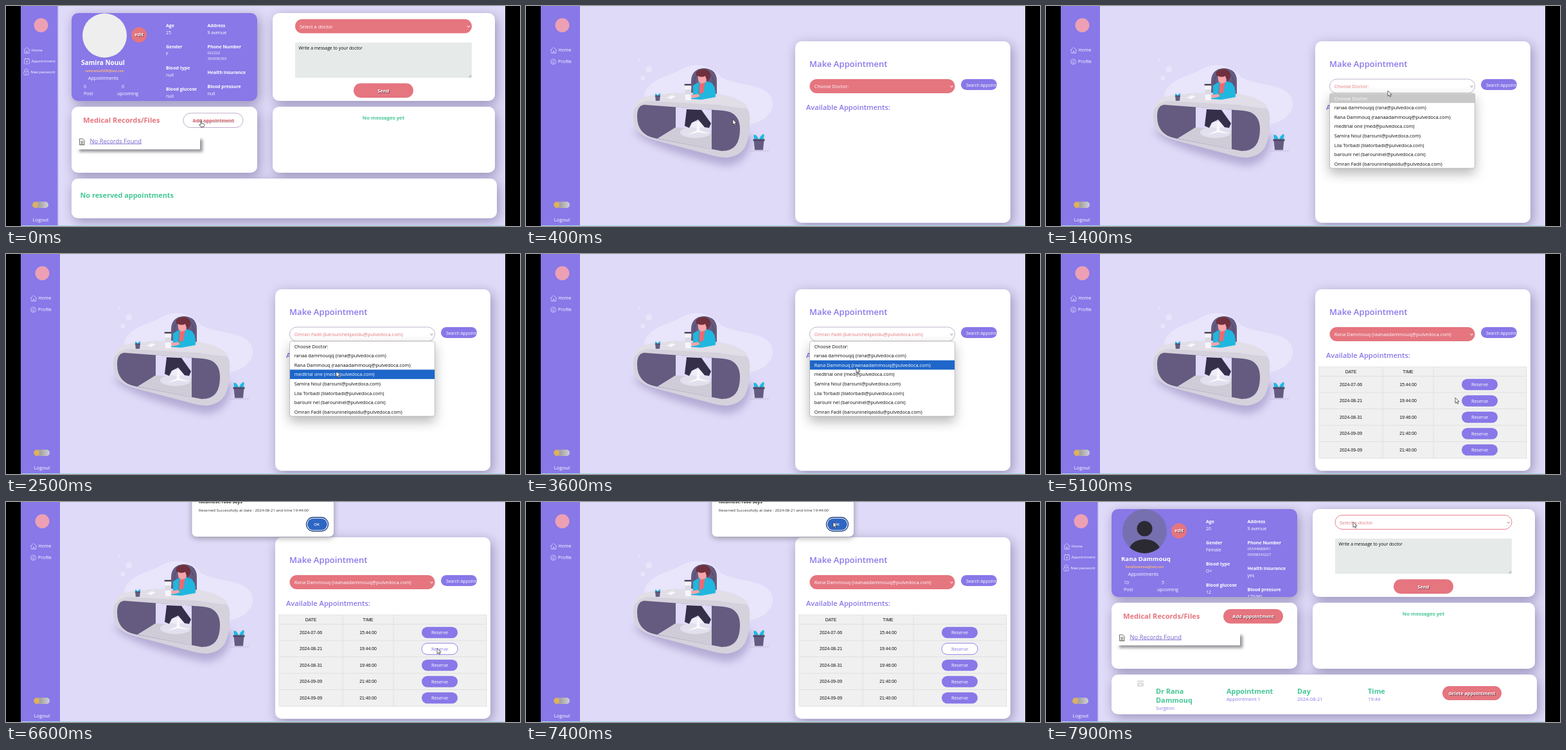
These frames come from a looping animation (800x343 px, 8 s). An HTML page:

```html
<!DOCTYPE html>
<html lang="en">
<head>
<meta charset="utf-8">
<title>Booking an appointment</title>
<style>
  html, body { margin: 0; width: 100%; height: 100%; overflow: hidden; background: #000; }
  svg { display: block; width: 800px; height: 343px; }
  text { font-family: "Open Sans", "Noto Sans", sans-serif; white-space: pre; }
  .grid text { font-family: "Liberation Sans", Arial, sans-serif; }
  .card { filter: drop-shadow(3px 5px 9px rgba(70, 58, 115, .46)); }
  .btn rect { fill: var(--fill); stroke: none; }
  .btn text, .btn path { fill: #fff; }
  .btn.on rect { fill: #fff; stroke: var(--line); stroke-width: .9; }
  .btn.on text { fill: var(--fill); }
  .btn.on path { fill: #999; }
  .raised text { filter: drop-shadow(1px 1px .6px rgba(50, 20, 40, .65)); }
  .raised.on text { filter: drop-shadow(1px 1px .6px rgba(50, 20, 40, .3)); }
  .option rect { fill: none; }
  .option text { fill: #0c0c0c; }
  .option.chosen rect { fill: #c8c8c8; }
  .option.hover rect { fill: #1e66c9; }
  .option.chosen text, .option.hover text { fill: #fff; }
</style>
</head>
<body>
<svg id="stage" viewBox="0 0 800 343" xmlns="http://www.w3.org/2000/svg"></svg>
<script>
const PURPLE = '#8878e8', CORAL = '#e5757f', GREEN = '#45c795', DARK = '#655b80', PALE = '#dfdaf7';
const LOOP = 8000, ROW_TOP = 136.6, ROW_H = 14.58;

// Drawing helpers
const text = (x, y, s, size, fill = '#fff', weight = 400, more = '') =>
  `<text x="${x}" y="${y}" font-size="${size}" fill="${fill}" font-weight="${weight}" ${more}>${s}</text>`;
const mid = (x, y, s, size, fill, weight, more = '') =>
  text(x, y, s, size, fill, weight, 'text-anchor="middle" ' + more);
const box = (x, y, x2, y2, r, fill, more = '') =>
  `<rect x="${x}" y="${y}" width="${x2 - x}" height="${y2 - y}" rx="${r}" fill="${fill}" ${more}/>`;
const path = (d, fill, more = '') => `<path d="${d}" fill="${fill}" ${more}/>`;
const dot = (x, y, r, fill, more = '') => `<circle cx="${x}" cy="${y}" r="${r}" fill="${fill}" ${more}/>`;
const oval = (x, y, rx, ry, fill, more = '') =>
  `<ellipse cx="${x}" cy="${y}" rx="${rx}" ry="${ry}" fill="${fill}" ${more}/>`;
const group = (id, body, more = '') => `<g id="${id}" ${more}>${body}</g>`;
const button = (id, x, y, x2, y2, label, fill, line, cls = '') =>
  group(id, box(x, y, x2, y2, (y2 - y) / 2, '') + label,
    `class="btn ${cls}" style="--fill:${fill};--line:${line}"`);
const chevron = (x, y) => path(`M${x} ${y}l2 2 2-2 .6.6-2.6 2.6-2.6-2.6z`, '');
const outline = 'stroke="#fff" stroke-width=".6" stroke-opacity=".85"';

const icons = {
  home: (x, y) => path(`M${x - 5} ${y}l5-4.4 5 4.4M${x - 3.7} ${y - 1}v5.6h7.4V${y - 1}M${x - 1} ${y + 4.6}v-3h2v3`, 'none', outline),
  calendar: (x, y) => box(x - 4, y - 3.5, x + 4, y + 4.2, 1, 'none', outline) +
    path(`M${x - 2} ${y - 5}v2.5M${x + 2} ${y - 5}v2.5M${x} ${y - .8}v3M${x - 1.5} ${y + .7}h3`, 'none', outline),
  lock: (x, y) => box(x - 3.6, y - 1, x + 3.6, y + 4.5, 1, 'none', outline) +
    path(`M${x - 2.5} ${y - 1}v-1.5a2.5 2.5 0 0 1 5 0V${y - 1}M${x - 1.5} ${y + 1.8}h3`, 'none', outline),
  user: (x, y) => dot(x, y, 4.2, 'none', outline) + path(`M${x - 1.8} ${y - 2.5}v5.5M${x + 1.2} ${y - 2.8}v5.6h-2`, 'none', outline)
};

function sidebar(edge, cx, items, gap) {
  const links = items.map(([icon, label, x, y, size]) => icons[icon](x, y) + text(x + gap, y + 2.4, label, size)).join('');
  return box(23, 0, edge, 343, 0, PURPLE) + dot(cx + 1, 30, 11, '#eda0b4') + links +
    box(cx - 12.5, 305, cx + 12.5, 315, 5, 'url(#knob)') + dot(cx - 7.7, 310, 4.4, '#dcb064') +
    mid(cx + .5, 336, 'Logout', 7.7);
}

// Profile page
function profileData(id, p) {
  const facts = (x, list) => list.map(([y, label, value]) =>
    text(x, y, label, 7, '#fff', 700) + text(x, y + 11, value, 7)).join('');
  return group(id, p.avatar + text(117, 91.5, p.name, p.nameSize, '#fff', 700) +
    mid(153.5, 103, p.mail, 4.6, '#f9b184', 700) +
    text(121, 127.5, p.posts, 7) + text(180, 127.5, p.next, 7) +
    facts(249, [[33, 'Age', p.age], [66, 'Gender', p.gender], [99, 'Blood type', p.type], [132, 'Blood glucose', p.glucose]]) +
    facts(313.5, [[33, 'Address', '9 avenue'], [106, 'Health insurance', p.insured], [p.pressY, 'Blood pressure', p.pressure]]) +
    text(313.5, 66, 'Phone Number', 7, '#fff', 700) +
    text(313.5, 75.3, p.phones[0], 5.8) + text(313.5, 84.3, p.phones[1], 5.8), 'clip-path="url(#info)"');
}

const seal = dot(153.5, 46, 34.5, '#efeeee');
const silhouette = dot(153.5, 45.5, 34.5, '#7770b0') +
  `<g clip-path="url(#face)">${dot(153.5, 41.5, 12, '#2b2a33')}${oval(153.5, 78, 25, 20, '#2b2a33')}</g>`;

function profilePage() {
  const first = profileData('before', {
    avatar: seal, name: 'Samira Nouul', nameSize: 10, mail: 'samiranoul5200@test.com', posts: 0, next: 0, age: 25, gender: 'F',
    type: 'null', glucose: 'null', insured: '', pressY: 128, pressure: 'null', phones: ['022222', '303030303']
  });
  const second = profileData('after', {
    avatar: silhouette, name: 'Rana Dammouq', nameSize: 9.6, mail: 'RanaDammouq@test.com', posts: 10, next: 5, age: 20, gender: 'Female',
    type: 'O+', glucose: 12, insured: 'yes', pressY: 139, pressure: '170/90', phones: ['05544880091', '05098343227']
  });
  const title = (x, y, s) => text(x, y, s, 10.9, GREEN, 700);
  const cell = (x, head, sub) => title(x, 299, head) + text(x, 310, sub, 7.6, PURPLE);
  const booking = title(171, 299, 'Dr Rana') + title(171, 313, 'Dammouq') +
    text(171, 324, 'Surgeon', 7.5, PURPLE) + cell(281, 'Appointment', 'Appointment 1') +
    cell(391, 'Day', '2024-08-21') + cell(501, 'Time', '19:44') +
    box(142, 278, 152, 288, 2, '#dcdcdc') + path('M142 281.5h10M145 276v4M149 276v4M147 283v4M145 285h4', 'none', 'stroke="#fff"') +
    button('drop', 617, 287, 709, 309, mid(663, 301, 'delete appointment', 7.35, '', 700), CORAL, CORAL, 'raised');
  return box(23, 0, 777, 343, 0, '#e0dbf8') +
    sidebar(80, 53.5, [['home', 'Home', 32.5, 69, 6], ['calendar', 'Appointment', 32.5, 86, 6.1], ['lock', 'New password', 31.5, 103, 5.5]], 7) +
    box(80, 0, 81.5, 343, 0, '#b5acf0') +
    [[102, 11, 391, 148, PURPLE], [415, 11, 761, 148, '#fff'], [102, 157, 391, 260, '#fff'], [415, 157, 761, 260, '#fff'],
      [102, 269, 764, 331, '#fff']].map(([x, y, x2, y2, c]) => box(x, y, x2, y2, 10, c, 'class="card"')).join('') +
    first + second +
    button('edit', 195, 33, 219, 57, mid(207, 47.4, 'edit', 7.2, '', 700), CORAL, CORAL, 'raised') +
    mid(151.5, 114.5, 'Appointments', 7.1) + text(121, 138.5, 'Post', 7.1) + text(173, 138.5, 'upcoming', 7.1) +
    button('pick', 450, 20.5, 725, 42.5, text(457, 34.5, 'Select a doctor', 7.5) + chevron(718, 30.5), CORAL, CORAL) +
    box(450, 57, 725, 112, 0, '#e6ebea') + text(455.5, 68, 'Write a message to your doctor', 6.8, '#0c0c0c') +
    path('M720.5 111l3.5-3.5M722.5 111l1.5-1.5', 'none', 'stroke="#777" stroke-width=".7"') +
    button('send', 541, 120.5, 634, 143, mid(587.5, 134.5, 'Send', 7.5, '', 700), CORAL, CORAL, 'raised') +
    text(120, 181.5, 'Medical Records/Files', 11.1, CORAL, 700) +
    button('add', 276, 167, 369, 189.5, mid(322.7, 181, 'Add appointment', 7.4, '', 700), CORAL, '#b9a4c6', 'raised') +
    box(110, 204, 302, 223.5, 0, '#fff', 'style="filter:drop-shadow(4px 4px 2px rgba(60,60,70,.55))"') +
    path('M114.5 207h5l2.5 2.5v7h-7.5zM116 211h4.5M116 213h4.5M116 215h4.5', '#fff', 'stroke="#444" stroke-width=".8"') +
    text(130.5, 213.5, 'No Records Found', 9.4, '#7568cf', 400, 'text-decoration="underline"') +
    mid(587.5, 176.5, 'No messages yet', 7.8, GREEN, 700) +
    group('empty', title(115.5, 298.5, 'No reserved appointments')) + group('booked', booking);
}

// Booking page
function plant(x, y, k) {
  return `<g transform="translate(${x} ${y}) scale(${k})">` +
    path('M-8-8Q-3-8-1-2L-.5 2H-4Q-9-1-8-8ZM8-9Q3-8 1-2L.5 2H4Q9-1 8-9Z', '#20b9e2') +
    path('M-8 0H8L6.5 16H-6.5Z', DARK) + box(-9, -1, 9, 2, 0, '#514868') + '</g>';
}

function scene() {
  return path('M186 132C198 112 224 109 245 97C268 86 288 94 302 109C318 126 383 117 384 151C384 174 360 187 330 185L210 176C190 166 180 150 186 132Z', '#e9e5fb') +
    dot(182, 112, 3.6, '#e9e5fb') + dot(191, 99, 5, '#e9e5fb') + dot(177, 85, 1.6, '#e9e5fb') +
    path('M166 194Q190 222 310 249Q345 248 352 205L330 190Z', 'rgba(100,85,150,.34)', 'style="filter:blur(6px)"') +
    path('M257 143V116Q258 98 277 97Q297 98 297 117V143Z', DARK) +
    path('M262 143V117Q264 103 277 103M292 143V117Q290 103 277 103', 'none', 'stroke="#494064" stroke-width=".8"') +
    path('M190 142L297 137Q343 145 348 168Q350 200 341 220Q327 242 294 234L200 209Q166 200 167 172Q168 144 190 142Z', '#d5d2dd') +
    path('M186 141Q230 132 298 137Q338 143 346 160Q325 158 300 154L190 148Q178 149 169 160Q171 144 186 141Z', '#e1dee7') +
    path('M184 154L306 163Q333 165 333 192Q333 227 304 226L200 206Q173 200 173 172Q173 155 184 154Z', DARK) +
    path('M233 157.5L289 161.7V223L205 206.5 233 190Z', PALE) + path('M205 206.5L233 189 289 194V223Z', '#cfccd8') +
    oval(264, 197, 24, 9, '#e2e0ec') + oval(268, 185, 20, 5, '#eeecf7') +
    path('M266 181h4v13l16 5-18-2-18 4 16-7z', '#faf9fd') +
    path('M250 161L273 162 288 183 285 190 278 189 268 177 258 182 254 190 247 187Z', '#352f4a') +
    path('M260 124Q271 115 287 119Q296 124 295 142L273 146 257 145 260 136Z', '#20b7df') +
    path('M270 121l9-3-3 17-7 3z', '#ee6872') + path('M269 122Q268 133 270 144', 'none', 'stroke="#158cad" stroke-width=".7"') +
    path('M268 107Q266 119 273 121L280 119 282 108Z', '#f4a5aa') +
    path('M265 109Q263 101 271 99Q284 96 287 106Q288 113 283 117Q280 114 279 109Q273 112 268 109Z', '#70303f') +
    path('M256 139l12-2 3 4-12 3z', '#f4a5aa') +
    path('M247 123h10.5l-1 24h-8.5z', '#f6f5fa') + box(246.5, 121.5, 258, 124, 1, '#4b435f') + box(247.5, 130, 257, 138, 0, '#dcd9e4') +
    path('M219 143l8-4 6 2-7 4z', '#f7f6fb') + plant(205, 140, .48) + plant(362.5, 208.5, 1) +
    path('M345 226h33', 'none', 'stroke="#c5bfdf" stroke-width="1"');
}

const site = '@pulvedoca.com';
const doctors = ['Choose Doctor:', ...[
  ['ranaa dammouqq', 'rana'], ['Rana Dammouq', 'raanaadammouq'], ['medtrial one', 'med'], ['Samira Noul', 'barouni'],
  ['Lila Torbadi', 'lilatorbadi'], ['barouni nel', 'barouninel'], ['Omran Fadil', 'barouninelqasidu']
].map(([name, user]) => `${name} (${user}${site})`)];
const slots = [['2024-07-06', '15:44:00'], ['2024-08-21', '19:44:00'], ['2024-08-31', '19:46:00'],
  ['2024-09-09', '21:40:00'], ['2024-09-09', '21:40:00']];

function slotTable() {
  const ink = '#111', edge = 'stroke="#dcdcdc" stroke-width=".8"';
  const cells = (y, a, b) => `<g class="grid">${mid(474.5, y, a, 6.85, ink)}${mid(563.5, y, b, 6.85, ink)}</g>`;
  const rows = slots.map(([day, time], i) => {
    const y = 203.5 + i * 25.5;
    return path(`M425 ${y - 13}H748`, 'none', edge) + cells(y + 2.2, day, time) +
      button('slot' + i, 647, y - 8.8, 703, y + 8.8, mid(675, y + 2.5, 'Reserve', 7.05), PURPLE, PURPLE);
  });
  return box(425, 176, 748, 318.5, 0, '#f0f0f0', edge) + path('M524 176V318M603 176V318', 'none', edge) +
    cells(185.7, 'DATE', 'TIME') + rows.join('');
}

function bookingPage() {
  const options = doctors.map((d, i) => {
    const y = ROW_TOP + i * ROW_H;
    return group('option' + i, box(442, y, 667, y + ROW_H, 0, '') + text(448.7, y + 10, d, 7.4, ''), 'class="option"');
  }).join('');
  return box(23, 0, 777, 343, 0, PALE) +
    sidebar(84, 55.5, [['home', 'Home', 43, 69, 7], ['user', 'Profile', 42.5, 87, 7]], 7.5) + scene() +
    box(419, 55, 754, 338, 10, '#fff', 'class="card"') +
    text(441, 95, 'Make Appointment', 13.1, PURPLE, 600) +
    button('select', 441.5, 114, 667.5, 136, text(448.7, 127.7, '', 7.45, '', 400, 'id="value"') + chevron(660.5, 124), CORAL, '#b9abc8') +
    button('search', 677, 114, 733, 131, text(685, 125.5, 'Search Appointments', 6.6, '', 400, 'clip-path="url(#trim)"'), PURPLE, PURPLE) +
    text(436, 162, 'Available Appointments:', 11.1, PURPLE, 600) + group('slots', slotTable()) +
    group('menu', box(441.5, 136, 667.5, 253, 3, '#fff', 'stroke="#aaa" stroke-width=".7" style="filter:drop-shadow(0 8px 9px rgba(0,0,0,.28))"') + options) +
    group('alert', box(289.5, -20, 510, 54, 7, '#fff', 'style="filter:drop-shadow(0 2px 5px rgba(0,0,0,.35))"') +
      text(300, 1.6, 'localhost:1600 says', 7.1, '#222', 700) +
      text(300, 15.3, 'Reserved Successfully at date : 2024-08-21 and time 19:44:00', 6.05, '#333') +
      box(467.5, 24, 501.5, 45.5, 10.7, '#fff', 'stroke="#22437c" stroke-width="1.3"') +
      box(469.2, 25.7, 499.8, 43.8, 9, '#2d66c3') + mid(483.5, 37.2, 'OK', 6, '#fff', 600));
}

const stage = document.getElementById('stage');
stage.innerHTML = `<defs>
  <linearGradient id="knob"><stop offset="0" stop-color="#c9a76c"/><stop offset=".4" stop-color="#a5a2a4"/><stop offset="1" stop-color="#d0ced6"/></linearGradient>
  <clipPath id="view">${box(23, 0, 777, 343, 0, '')}</clipPath>
  <clipPath id="info">${box(102, 11, 391, 148, 10, '')}</clipPath>
  <clipPath id="face">${dot(153.5, 45.5, 34.5, '')}</clipPath>
  <clipPath id="trim">${box(677, 114, 732.5, 131, 0, '')}</clipPath></defs>` +
  box(0, 0, 800, 343, 0, '#000') +
  `<g clip-path="url(#view)">${group('profile', profilePage())}${group('booking', bookingPage())}</g>` +
  box(23, 342, 777, 343, 0, '#a5d9e6') +
  group('cursor', group('arrow', path('M0 0V8.5L2 6.8 3.4 9.7 4.7 9.1 3.4 6.2H6Z', '#fff', 'stroke="#222" stroke-width=".7"')) +
    group('hand', path('M-.8.5Q0-.6.8.5V4L4 4.8Q5 5 4.8 6.5L4 9.5H-1L-3.3 6Q-3 4.6-1.6 5.6L-.8 6.2Z', '#fff', 'stroke="#222" stroke-width=".7"')));

const el = {};
stage.querySelectorAll('[id]').forEach(n => el[n.id] = n);

// Pointer stops: time, x, y
const stops = [[0, 304, 179], [300, 304, 179], [900, 545, 145], [1100, 532, 132], [1400, 532, 132], [1900, 528, 244], [2050, 528, 244],
  [2300, 518, 126], [2500, 514, 183], [2900, 514, 169], [3600, 514, 176.5], [3700, 514, 176.5], [4000, 704, 122],
  [4200, 704, 122], [4800, 637, 224], [5100, 637, 224], [5400, 671, 228], [6600, 671, 228], [7200, 478, 31], [LOOP, 478, 31]];

function pointer(t) {
  const i = Math.max(1, stops.findIndex(s => s[0] > t));
  const [a, b] = [stops[i - 1], stops[i]];
  const k = (t - a[0]) / (b[0] - a[0]), e = k * k * (3 - 2 * k);
  return [a[1] + (b[1] - a[1]) * e, a[2] + (b[2] - a[2]) * e];
}

const show = (id, on) => el[id].style.display = on ? '' : 'none';
const lit = (id, on) => el[id].classList.toggle('on', on);
const between = (t, a, b) => t >= a && t < b;

function draw(t) {
  const [x, y] = pointer(t);
  const inside = (a, b, c, d) => x > a && x < c && y > b && y < d;
  const booking = between(t, 300, 7500), done = t >= 7500;
  const choice = t < 2100 ? 0 : t < 3700 ? 7 : 2;
  const open = between(t, 1400, 2100) || between(t, 2300, 3700);
  const onSearch = booking && inside(677, 114, 733, 131);

  show('profile', !booking); show('booking', booking);
  show('before', !done); show('after', done);
  show('empty', !done); show('booked', done);
  show('menu', open); show('slots', t >= 4200); show('alert', t >= 6600);

  lit('add', t < 300);
  lit('pick', done);
  lit('select', open || inside(441, 114, 668, 136));
  lit('search', onSearch);
  lit('slot1', t >= 5300);
  el.value.textContent = doctors[choice];

  const over = y < ROW_TOP ? -1 : Math.floor((y - ROW_TOP) / ROW_H);
  doctors.forEach((_, i) => {
    el['option' + i].classList.toggle('hover', i === over);
    el['option' + i].classList.toggle('chosen', over < 0 && i === choice);
  });

  const hand = t < 300 || onSearch || between(t, 5300, 6600);
  show('hand', hand); show('arrow', !hand);
  el.cursor.setAttribute('transform', `translate(${x} ${y})`);
}

const start = performance.now();
function tick() {
  const t = (performance.now() - start) % LOOP;
  draw(Math.floor(t / 100) * 100);
  requestAnimationFrame(tick);
}
tick();
</script>
</body>
</html>
```
